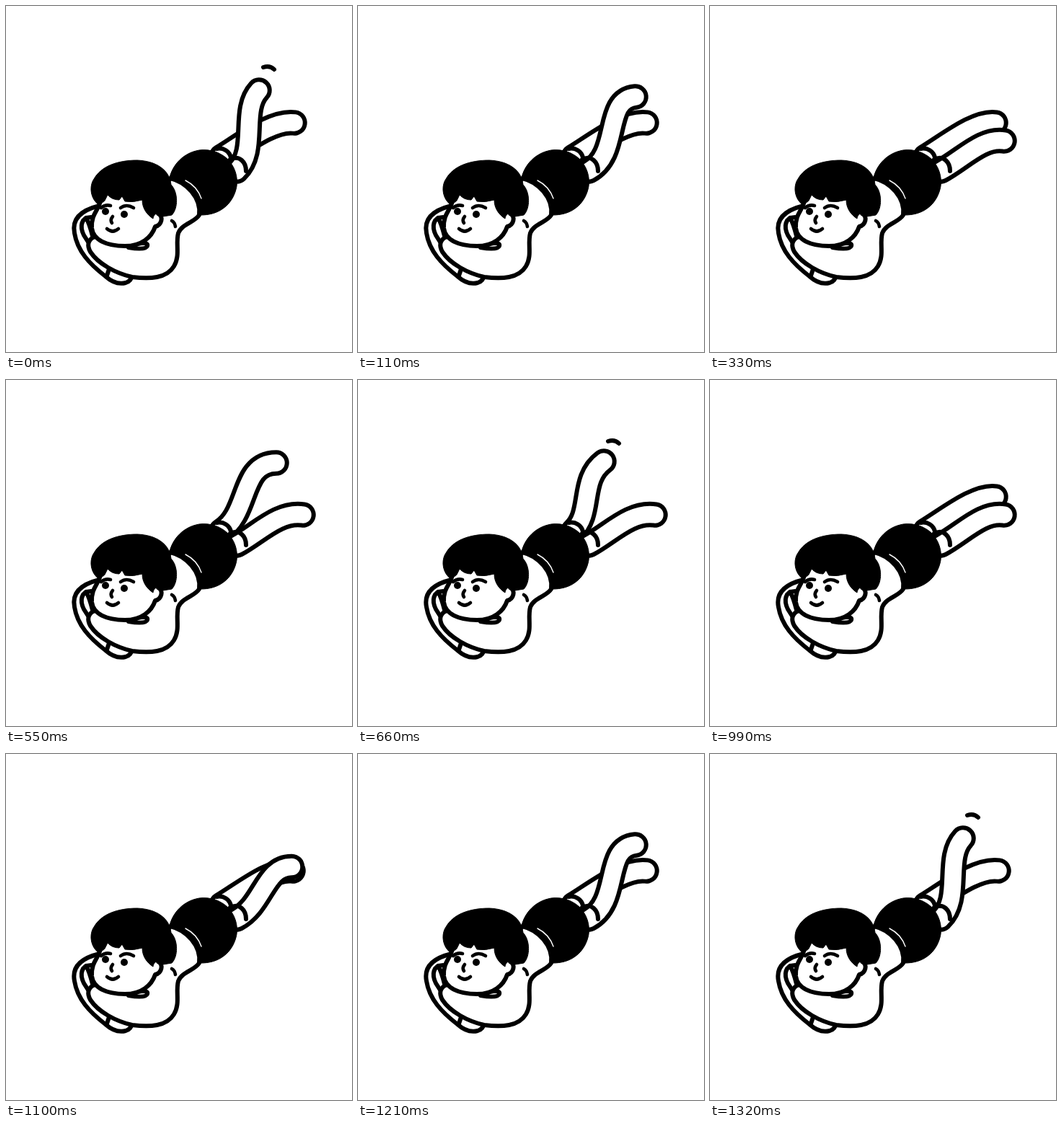
An HTML page that plays this animation: 480 px wide and 480 px high, repeating every 1.43 s.

```html
<!DOCTYPE html>
<html lang="en">
<head>
<meta charset="utf-8">
<title>Kicking legs</title>
<style>
  html, body { margin: 0; height: 100%; overflow: hidden; background: #fff; }
  svg { display: block; width: 100%; height: 100%; }
  path { fill: none; stroke: #000; stroke-width: 6; stroke-linecap: round; stroke-linejoin: round; }
  .skin { fill: #fff; }
  .solid { fill: #000; stroke-width: 1; }
  .thin { stroke-width: 4.6; }
  .leg { stroke-width: 35.5; }
  .leg + .leg { stroke: #fff; stroke-width: 23.5; }
</style>
</head>
<body>
<svg viewBox="0 0 480 480">
  <g id="far"><path class="leg"/><path class="leg"/></g>
  <path d="M292 198C302 196 310 202 312 210"/>
  <g id="near"><path class="leg"/><path class="leg"/></g>
  <path d="M311 213C324 206 333 217 333 229"/>
  <path id="swish" d="M357 85q9 -3 15 3"/>

  <!-- shorts and torso -->
  <path class="solid" d="M227 238C231 221 245 204 268 200C285 198 298 204 307 212C317 222 322 236 320 250C316 273 298 291 268 290L262 262Z"/>
  <path class="skin" d="M130 277C105 283 91 295 95 315C99 340 116 358 138 375C148 384 158 386 166 384C172 382 174 378 174 375L160 300Z"/>
  <path d="M144 362L140 374"/>
  <path class="skin" d="M118 293C104 293 102 306 108 318L115 329"/>
  <path d="M111 294C115 300 118 311 120 319"/>
  <path class="skin" d="M228 239C250 244 271 266 268 290C262 300 244 302 239 315C235 330 242 346 233 361C223 378 200 379 175 376C153 371 128 358 117 341C112 332 114 325 121 321L160 300L205 270Z"/>
  <path d="M249 242Q265 250 271 267" style="stroke:#fff;stroke-width:1.4"/>
  <path d="M230 298Q234 300 235 306" class="thin"/>
  <path class="skin" d="M170 335C182 329 198 326 196 333C194 338 181 337 170 335Z"/>

  <!-- head -->
  <path class="skin" d="M130 274C127 284 118 290 119 308C121 325 140 333 165 333C188 333 202 321 207 306C216 304 219 292 211 288L190 245H135Z"/>
  <path class="solid" d="M129 276C117 268 115 250 122 240C132 222 155 214 182 214C208 215 227 227 229 248C239 258 239 281 230 290L218 292C212 284 205 288 204 295C196 290 189 281 189 269Q176 273 165 271L161 264L157 269Q147 269 141 262L137 270Z"/>
  <path class="thin" d="M132 280Q138 275 145 277M159 280Q167 274 177 280M148 292Q144 297 147 301M140 309Q148 316 156 309"/>
  <circle cx="138" cy="285" r="5"/>
  <circle cx="164" cy="289" r="5"/>
</svg>
<script>
const STEP = 110, RAISED = 3, STEPS = 4 * RAISED + 1;

// Each leg is a Bezier centreline: a fixed hip, then two handles and the foot
// in three poses.
const LEGS = {
  near: {
    hip: [320, 229],
    rest: [350, 213, 378, 182, 408, 187],
    bent: [365, 205, 340, 130, 385, 126],
    high: [350, 200, 325, 145, 351, 117]
  },
  far: {
    hip: [299, 209],
    rest: [330, 190, 370, 158, 396, 162],
    bent: [338, 185, 325, 115, 375, 115],
    high: [326, 185, 307, 138, 341, 113]
  }
};

const $ = id => document.getElementById(id);
const mix = (a, b, f) => a.map((v, i) => v + (b[i] - v) * f);

function drawLeg(id, swing) {
  const { hip, rest, bent, high } = LEGS[id], lift = Math.max(0, swing);
  const curve = lift < 2 ? mix(rest, bent, lift / 2) : mix(bent, high, lift - 2);
  // The resting leg stretches a little while the other one is up
  curve[4] += 2 * Math.min(2, Math.max(0, -swing));
  for (const path of $(id).children) path.setAttribute('d', `M${hip}C${curve}`);
}

function draw() {
  const step = Math.floor(performance.now() / STEP) % STEPS;
  const swing = RAISED - Math.min(step, STEPS - 1 - step);
  drawLeg('near', swing);
  drawLeg('far', -swing);
  $('swish').style.display = Math.abs(swing) === RAISED ? '' : 'none';
  $('swish').setAttribute('transform', `translate(${swing < 0 ? -10 : 0})`);
  requestAnimationFrame(draw);
}
draw();
</script>
</body>
</html>
```
